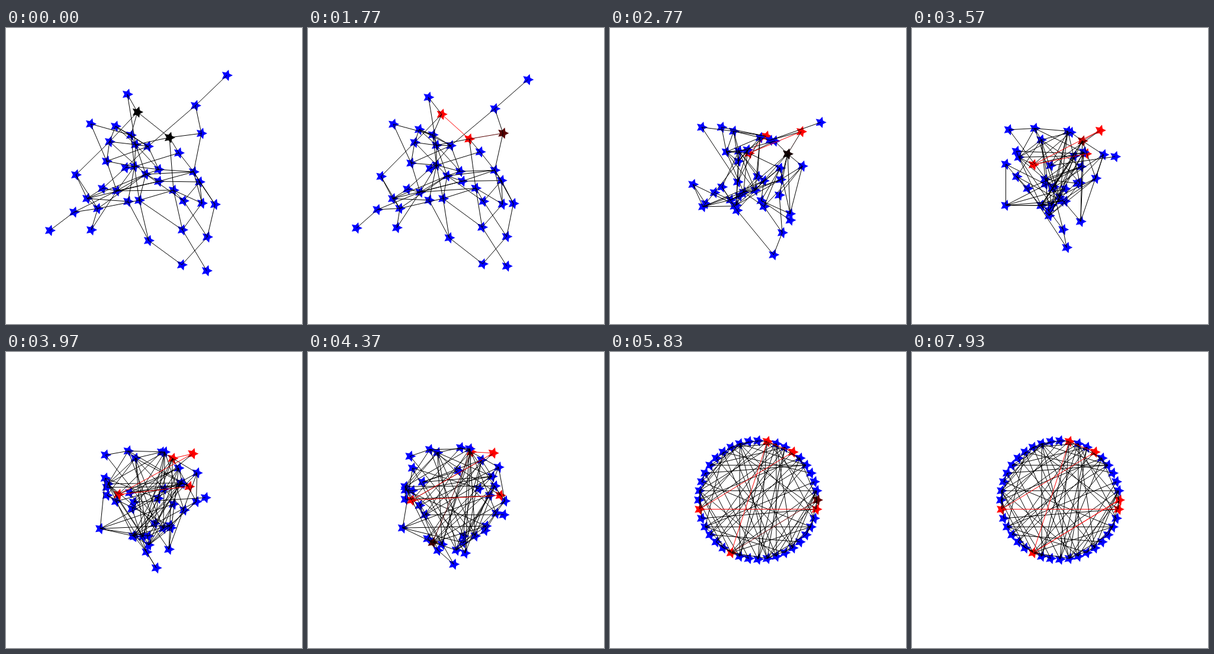
An HTML page with a canvas that plays this animation: 500 px wide and 500 px high, repeating every 8000 ms.

```html
<!DOCTYPE html>
<html lang="en">
<head>
<meta charset="utf-8">
<title>Graph walk</title>
<style>
  html, body { margin: 0; width: 100%; height: 100%; overflow: hidden; background: #fff; }
  canvas { display: block; }
</style>
</head>
<body>
<canvas id="stage" width="500" height="500"></canvas>
<script>
const ctx = document.getElementById('stage').getContext('2d');
const LOOP = 8000, FPS = 30, STAGE = 40;

// Scattered layout; node k travels to angle 9k degrees on the ring.
const scattered = [
  [258, 259], [222, 142], [202, 236], [137, 288], [163, 271], [373, 80], [170, 225], [118, 248],
  [185, 166], [187, 275], [331, 296], [297, 400], [258, 239], [236, 247], [340, 353], [300, 292],
  [320, 131], [155, 305], [205, 112], [276, 185], [353, 298], [219, 197], [206, 293], [241, 359],
  [298, 341], [143, 162], [115, 311], [211, 181], [217, 234], [339, 410], [292, 211], [317, 243],
  [240, 200], [283, 274], [330, 178], [327, 260], [225, 291], [74, 342], [144, 341], [175, 192]
];

const neighbours = {
  0: [3, 9, 31, 35], 1: [18, 27, 39], 2: [4, 28, 32], 3: [4, 7, 13, 17, 22], 5: [16],
  6: [9, 25, 28, 32, 39], 7: [17, 39], 8: [21, 27, 32, 39], 9: [4, 13, 26, 28, 33, 38],
  10: [24, 31, 33, 35], 11: [14, 23], 12: [13, 21, 28, 31, 32], 13: [15, 17, 21, 36, 39],
  14: [15, 20], 15: [33, 35], 16: [32, 34], 17: [26, 36, 38], 18: [21], 19: [21, 30, 33],
  20: [31, 35], 21: [27, 28, 32, 39], 22: [23, 28], 23: [36], 24: [29, 33, 36], 25: [27],
  26: [37], 27: [28, 32], 28: [30, 36], 30: [31], 31: [35], 33: [36]
};

// Nodes visited in order; the last step goes back along the same edge.
const trail = [1, 19, 34, 31, 13, 0, 13];

const clamp = v => Math.max(0, Math.min(1, v));
const fade = (frame, start) =>
  `rgb(${Math.round(255 * clamp((frame - start) / (STAGE - 1)))},0,0)`;

function position([x, y], k, progress) {
  const angle = k * Math.PI / 20;
  return [
    x + (250 + 100 * Math.cos(angle) - x) * progress,
    y + (250 + 100 * Math.sin(angle) - y) * progress
  ];
}

function star([x, y], color) {
  ctx.beginPath();
  for (let i = 0; i < 10; i++) {
    const radius = i % 2 ? 5 : 10, angle = i * Math.PI / 5;
    ctx.lineTo(x + radius * Math.cos(angle), y + radius * Math.sin(angle));
  }
  ctx.fillStyle = color;
  ctx.fill();
}

function line(from, to, color) {
  ctx.beginPath();
  ctx.moveTo(...from);
  ctx.lineTo(...to);
  ctx.strokeStyle = color;
  ctx.stroke();
}

function nodeColor(k, frame) {
  const step = trail.indexOf(k);
  const start = STAGE * Math.max(0, step - 1);
  return step < 0 || frame < start ? '#00f' : fade(frame, start);
}

function draw(time) {
  const frame = Math.floor((time % LOOP) * FPS / 1000 + 0.15);
  const progress = clamp((frame - 50) / 100);
  const nodes = scattered.map((p, k) => position(p, k, progress));

  ctx.fillStyle = '#fff';
  ctx.fillRect(0, 0, 500, 500);
  ctx.lineWidth = 1;

  nodes.forEach((p, k) => star(p, nodeColor(k, frame)));
  for (const [a, list] of Object.entries(neighbours)) {
    for (const b of list) line(nodes[a], nodes[b], '#000');
  }
  const last = trail.length - 2;
  for (let i = 0; i <= last; i++) {
    const start = i * STAGE;
    if (i === last && frame < start) break;
    line(nodes[trail[i]], nodes[trail[i + 1]], fade(frame, start));
  }
}

const origin = performance.now();
function tick() {
  draw(performance.now() - origin);
  requestAnimationFrame(tick);
}
tick();
</script>
</body>
</html>
```
